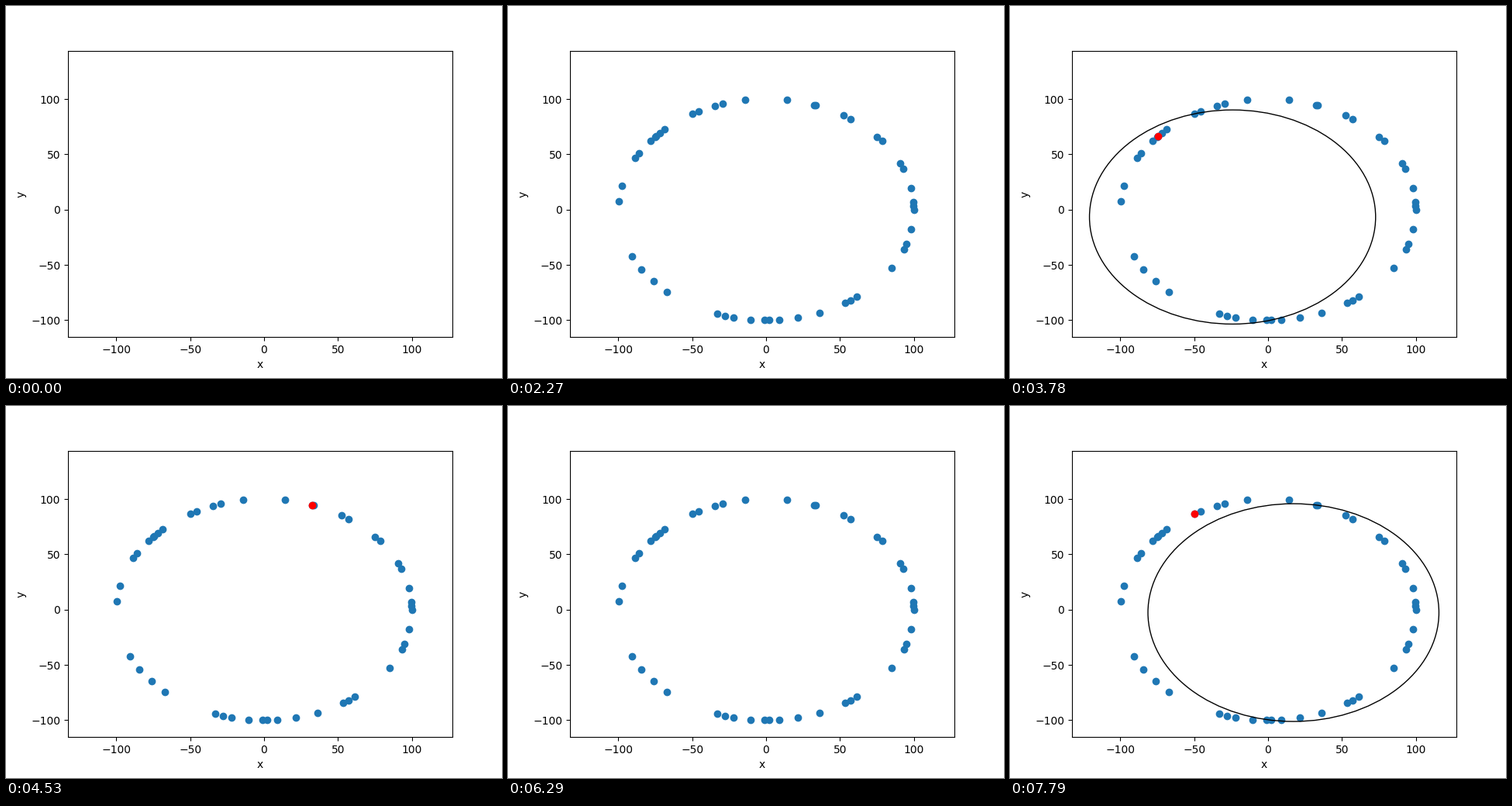
A matplotlib script for the animation above (8000 ms loop, 640 px wide and 480 px high).

```python
import matplotlib.pyplot as plt
import numpy as np
from matplotlib.animation import FuncAnimation

RADIUS = 100
INTERVAL = 250
FRAMES = 32

# Angles in degrees: close pairs, and evenly spaced runs (first, last, count)
PAIR_GAP = 3
PAIRS = [-21, 21.6, 38.2, 55.2, 107.2, 149.2]
RUNS = [
    (-32, 11.2, 3), (0, 4, 3), (70.3, 82, 2), (98, 117.2, 2),
    (133.4, 141.4, 4), (167.6, 175.7, 2), (205, 228, 4),
    (250.7, 257.3, 3), (264, 275, 3), (282.5, 291.3, 2), (302.2, 307.8, 3),
]


def on_ring(degrees):
    t = np.radians(degrees)
    return RADIUS * np.column_stack([np.cos(t), np.sin(t)])


def ring_angles():
    pairs = [(start, start + PAIR_GAP, 2) for start in PAIRS]
    return np.concatenate([np.linspace(*run) for run in pairs + RUNS])


# Points the algorithm visits
A, B, C, D = key_points = on_ring([120, 271.1, 71.07, 138.25])

fig, ax = plt.subplots(figsize=(6.4, 4.8), dpi=100)
ax.set_xlabel("x")
ax.set_ylabel("y")

points = ax.scatter(*np.vstack([on_ring(ring_angles()), key_points]).T, color="tab:blue")
marker = ax.scatter(*A, color="red")


def diameter_circle(p, q):
    """Smallest circle through two points."""
    circle = plt.Circle((p + q) / 2, np.hypot(*(p - q)) / 2, fill=False)
    return ax.add_patch(circle)


circle_ab = diameter_circle(A, B)
circle_ac = diameter_circle(A, C)
circle_bc = diameter_circle(B, C)
circles = [circle_ab, circle_ac, circle_bc]
ax.autoscale_view()
ax.autoscale(False)

# Each step highlights one point and may flash one candidate circle
STEPS = [
    (A, None), (B, None), (A, None), (D, circle_ab),
    (C, circle_ab), (A, None), (B, circle_ac), (A, circle_bc),
]


def update(frame):
    step, phase = divmod(frame - 2, 4)
    started = step >= 0
    point, candidate = STEPS[max(step, 0)]
    points.set_visible(frame > 0)
    marker.set_visible(started and phase < 3)
    marker.set_offsets([point])
    for circle in circles:
        circle.set_visible(started and phase == 1 and circle is candidate)
    return [points, marker, *circles]


anim = FuncAnimation(fig, update, frames=FRAMES, interval=INTERVAL,
                     repeat=True, repeat_delay=0)
plt.show()
```
